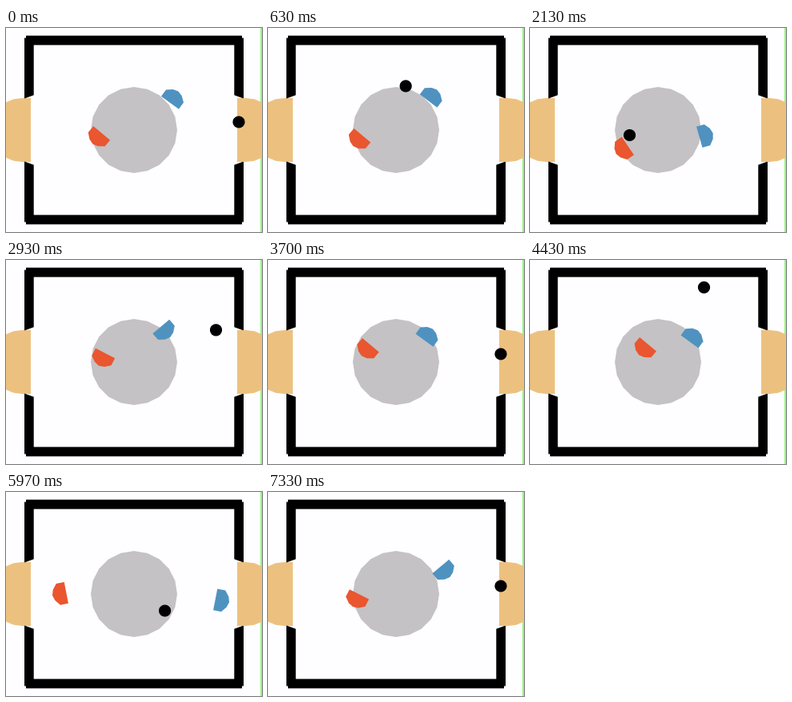
An HTML page with a canvas for the animation above (7.66 s loop, 320 px wide and 256 px high).

```html
<!DOCTYPE html>
<html lang="en">
<head>
<meta charset="utf-8">
<title>Air hockey</title>
<style>
  html, body { margin: 0; width: 100%; height: 100%; overflow: hidden; background: #fefdff; }
  canvas { display: block; }
</style>
</head>
<body>
<canvas width="320" height="256"></canvas>
<script>
const ctx = document.querySelector('canvas').getContext('2d');
const { sin, cos, min, max, abs, floor, PI } = Math;
const LOOP = 7660, STEP = 100 / 3, LAST = 220;
const TOP = 29, FLIGHT = 5.7; // bounce line of the puck, ticks per shot
const goals = [0, 23, 46.6, 89, 111, 136, 157, 177, 199, 220];

// Piecewise linear motion through [tick, ...values]
function along(keys, n) {
  let i = 1;
  while (i < keys.length - 1 && keys[i][0] < n) i++;
  const [t0, ...a] = keys[i - 1], [t1, ...b] = keys[i];
  const u = t1 > t0 ? min(1, max(0, (n - t0) / (t1 - t0))) : 1;
  return a.map((v, k) => v + (b[k] - v) * u);
}

function polygon(points, color) {
  ctx.fillStyle = color;
  ctx.beginPath();
  points.forEach(([x, y]) => ctx.lineTo(x, y));
  ctx.fill();
}

function box(x, y, w, h, color) {
  ctx.fillStyle = color;
  ctx.fillRect(x, y, w, h);
}

function disc(x, y, r, color, sides) {
  polygon(Array.from({ length: sides }, (_, i) => {
    const a = i / sides * 2 * PI;
    return [x + r * cos(a), y + r * sin(a)];
  }), color);
}

const paddleShape = [[-10, 20], [5, 20], [5, -20], [-10, -20], [-18, -10], [-21, 0], [-18, 10]];

function paddle([x, y, angle], side, color) {
  ctx.save();
  ctx.translate(x, y);
  ctx.rotate(angle * PI / 180);
  ctx.scale(0.68 * side, 0.68);
  polygon(paddleShape, color);
  ctx.restore();
}

// One quarter of the rink, for the other three mirrored
function corner(flipX, flipY) {
  ctx.save();
  ctx.translate(160, 128);
  ctx.scale(flipX, flipY);
  ctx.translate(-160, -128);
  box(25, 9.6, 135, 11.8, '#000');
  polygon([[23, 12.4], [34.7, 12.4], [34.7, 84.3], [23, 88.5]], '#000');
  ctx.restore();
}

function rink() {
  box(0, 0, 320, 256, '#fefdff');
  box(318, 0, 2, 256, '#90f878');
  disc(160, 128, 54, '#c4c2c4', 20);
  for (const side of [-1, 1]) {
    const x = 160 + side * 140;
    ctx.save();
    ctx.beginPath();
    ctx.rect(side < 0 ? 0 : 289, 0, 31, 256);
    ctx.clip();
    disc(x, 128, 40, '#ecc180', 24);
    box(side < 0 ? 20 : 289, 88, 11, 80, '#ecc180');
    ctx.restore();
    corner(side, 1);
    corner(side, -1);
  }
}

function scene(n) {
  const i = goals.findIndex(g => n <= g);
  const goal = goals[i], start = i ? goals[i - 1] + 1 : -22;
  const shot = goal - FLIGHT, ready = min(start + 17, shot - 3);

  // Each round varies in slow waves; every third red waits further forward.
  const wave = i * PI / 6, forward = cos((i + 1) * 2 * PI / 3);
  const wide = i % 6 === 3; // red backs off before shooting, both turn further
  const rx = 124.5 + 14 * forward + 5 * sin(wave) - 5 * sin(2 * wave);
  const ry = 125.7 - 5.7 * sin(wave) + 8.8 * cos(wave) + 8 * sin(2 * wave);
  const redEnd = [rx, ry, wide ? -63 : -50];
  const redHold = wide ? [rx - 3, ry + 30, -34] : redEnd;
  const blueEnd = [207 - 11 * sin(wave), 91 - 5 * sin(wave) - 13 * sin(2 * wave), wide ? 50 : -54];
  const blueHold = wide ? [215, 136, -16] : [208, 143, -48];
  const aim = [rx + 6, ry - 8];
  const hold = wide ? [rx + 2, ry + 14.5] : aim;

  const red = along([
    [start, 64, 128, 0], [start + 1, 72, 127, -11], [start + 10, ...redHold],
    [ready, ...redHold], [shot, ...redEnd], [goal, ...redEnd]
  ], n);
  const blue = along([
    [start, 256, 131, 0], [start + 1, 265, 135.6, 11], [start + 8, ...blueHold],
    [ready, ...blueHold], [goal - 3, ...blueEnd], [goal, ...blueEnd]
  ], n);
  // The shot is straight in unfolded space; the top wall folds it back.
  const goalY = 111 - 14 * forward;
  const [px, py] = along([
    [start, 198.6, 149], [start + 8, 198.6, 149], [start + 13, ...hold],
    [ready, ...hold], [shot, ...aim], [goal, 291, 2 * TOP - goalY]
  ], n);

  rink();
  paddle(red, 1, '#e9562f');
  paddle(blue, -1, '#4f92c0');
  disc(px, TOP + abs(py - TOP), 7.6, '#000', 24);
}

const begin = performance.now();
function tick() {
  const time = (performance.now() - begin) % LOOP;
  scene(min(LAST, floor((time + 6) / STEP)));
  requestAnimationFrame(tick);
}
tick();
</script>
</body>
</html>
```
